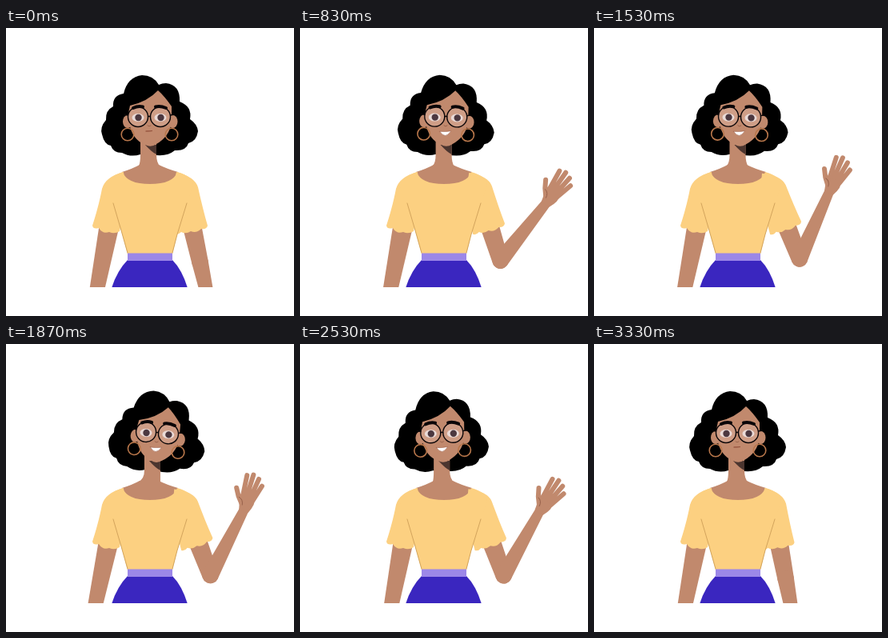
Recreate the animation shown at these times as an HTML page. Size 360x360 px, loop 3360 ms.

```html
<!DOCTYPE html>
<html lang="en">
<head>
<meta charset="utf-8">
<title>Waving woman</title>
<style>
  html, body { margin: 0; width: 100%; height: 100%; overflow: hidden; background: #fff; }
  svg { display: block; width: 100vw; height: 100vh; }
  .skin { fill: #c1896d; }
  .shirt { fill: #fcd081; }
  .line { fill: none; stroke-linecap: round; stroke-linejoin: round; }
  .finger { stroke: #c1896d; stroke-width: 6; }
  .seam { stroke: #d3a45c; stroke-width: 1; }
  .frame { stroke: #0b0608; stroke-width: 1.4; }
  .brow { stroke: #0b0608; stroke-width: 4; }
  .ring { stroke: #b9774b; stroke-width: 1.6; }
  .crease { stroke: #96604a; stroke-width: .9; }
</style>
</head>
<body>
<svg viewBox="0 0 360 360">
  <g class="head">
    <path id="hair" d="M191 71Q184 59 170 59Q152 61 147 82Q133 84 134 98Q124 103 125 115
      Q117 124 120 133Q123 146 131 147Q134 156 145 156Q156 162 168 158L182 158
      Q200 162 211 153Q225 154 228 144Q238 142 240 129Q239 120 230 114
      Q233 98 217 92Q218 71 200 69Q195 69 191 71Z"/>
  </g>

  <path id="neck" class="skin"/>
  <path id="neckShade" fill="#4b352f"/>
  <path class="skin" d="M167 171Q158 176 145 180Q150 200 180 200T215 180Q201 176 191 171Z"/>

  <g id="leftArm"><path class="skin" d="M117 244L104.500 326H123.500L142 246Z"/></g>
  <path id="upperArm" class="skin"/>
  <path id="forearm" class="skin"/>
  <g id="hand">
    <path class="skin" d="M-6 1L-9 -10Q-11 -18 -9 -21Q0 -25 8 -19Q12 -12 6 1Z"/>
    <path id="fingers" class="line finger"/>
    <path class="line crease" d="M-11 -14Q-5 -13 -4 -6"/>
  </g>

  <path class="shirt" d="M147 180Q124 186 120 201C117 217 112 235 108 247Q109 252 116 250
    Q121 258 129 255Q136 258 142 254L150 215Z"/>
  <g id="rightSleeve">
    <path class="shirt" d="M213 180Q236 186 240 199C244 217 248 233 252 247Q251 252 244 251
      Q238 257 231 254Q225 258 219 255Q215 259 211 257L206 210Z"/>
  </g>
  <path class="shirt" d="M146 180Q151 195 180 195T214 180Q232 185 234 195L226 219L214 258L208 283H152L144 253L124 196Q128 186 146 180Z"/>
  <path class="line seam" d="M134 219L144 253L152 281M226 219L214 258L208 281"/>
  <path fill="#3a26bf" d="M152 290H208Q220 302 227 325H132Q139 303 152 290Z"/>
  <path fill="#9c87e8" d="M152 281.500H208V291H152Z"/>

  <g class="head">
    <ellipse class="skin" cx="152" cy="117" rx="6" ry="8"/>
    <ellipse class="skin" cx="208.500" cy="117" rx="6" ry="8"/>
    <path class="skin" d="M190 78Q177 92 155 97Q152 108 154 119Q158 140 174 146Q181 150 188 145
      Q204 136 207 118L207 98Q198 85 190 78Z"/>
    <g id="eyes"></g>
    <path class="line brow" d="M159 100Q165 97 171 98.500M187 98.500Q193 97 200 100"/>
    <path class="line frame" d="M177.500 111Q179 109.500 180.500 111M152.500 109L148 108M205.500 109L210 108"/>
    <path class="line crease" d="M177 122Q179 124 181 122"/>
    <path id="mouth" class="line"/>
    <circle class="line ring" cx="152" cy="133" r="7.800"/>
    <circle class="line ring" cx="207" cy="133" r="7.800"/>
  </g>
  <path fill="#fff" d="M0 324H360V360H0Z"/>
</svg>

<script>
const LOOP = 3360, WAVE = 477, WAVE_START = 524;
const SHOULDER = [222, 200], UPPER = 95, LOWER = 91;
const FINGERS = [
  [-7, -18, -10, -43], [-2, -20, -2.5, -46], [3, -19, 5.5, -43], [7, -16, 12, -36]
];
const $ = id => document.getElementById(id);
const rad = deg => deg * Math.PI / 180;
const mix = (a, b, k) => a + (b - a) * k;
const clamp = (v, lo, hi) => Math.min(hi, Math.max(lo, v));
const smooth = (from, to, t) => {
  const k = clamp((t - from) / (to - from), 0, 1);
  return k * k * (3 - 2 * k);
};
const pulse = (t, a, b, c, d) => smooth(a, b, t) - smooth(c, d, t);

$('eyes').innerHTML = [165, 193].map(x => `
  <circle class="frame" cx="${x}" cy="111" r="12.5" fill="#cf9e87"/>
  <ellipse cx="${x}" cy="112" rx="7.5" ry="5" fill="#eadbd8"/>
  <circle cx="${x + .5}" cy="112" r="4.2" fill="#4c3840"/>`).join('');

// Point at a distance from p, with the angle measured clockwise from straight up
const reach = ([x, y], deg, len) =>
  [x + Math.sin(rad(deg)) * len, y - Math.cos(rad(deg)) * len];

// Tapered limb with round ends
function limb(p, q, r1, r2) {
  const deg = Math.atan2(q[0] - p[0], p[1] - q[1]) * 180 / Math.PI;
  const [a, b] = [reach(p, deg - 90, r1), reach(p, deg + 90, r1)];
  const [c, d] = [reach(q, deg + 90, r2), reach(q, deg - 90, r2)];
  return `M${a}A${r1} ${r1} 0 0 0 ${b}L${c}A${r2} ${r2} 0 0 0 ${d}Z`;
}

function drawArm(t, phase) {
  const raised = pulse(t, 0, 590, 2650, 3300);
  const wave = 32 - 10.5 * Math.cos(phase);
  const rest = mix(12.5, 10.7, t / LOOP);
  const upper = mix(rest, 21 - (wave - 26) * .28, raised);
  const fore = mix(180 - rest, wave, raised);
  const elbow = reach(SHOULDER, 180 - upper, UPPER);
  const wrist = reach(elbow, fore, LOWER);

  $('upperArm').setAttribute('d', limb(reach(SHOULDER, 180 - upper, 40), elbow, 12, 10.3));
  $('forearm').setAttribute('d', limb(elbow, wrist, 10.3, 6));
  $('rightSleeve').setAttribute('transform', `rotate(${12.5 - upper} ${SHOULDER})`);

  const bend = 9 * Math.cos(phase - rad(125));
  $('hand').setAttribute('transform', `translate(${wrist}) rotate(${fore + bend})`);
  const open = 1 - .85 * smooth(48, 70, fore);
  $('fingers').setAttribute('d', FINGERS.map(([x, y, tx, ty]) =>
    `M${x} ${y}L${mix(x, tx, open)} ${mix(y, ty, open)}`).join('') +
    'M-5 -7L-12 -15L-17.5 -24');
}

function drawHead(t, phase) {
  const sway = (2.3 + 8 * Math.cos(phase + Math.PI / 4)) * pulse(t, 0, 450, 2650, 3100);
  const shift = sway / 2;
  document.querySelectorAll('.head').forEach(g =>
    g.setAttribute('transform', `translate(${shift} 0) rotate(${shift} 180 170)`));
  // The far side of the hair tucks in as the head leans left
  const tuck = 1 + Math.min(0, sway) * .013;
  $('hair').setAttribute('transform', `translate(${120 * (1 - tuck)} 0) scale(${tuck} 1)`);
  $('leftArm').setAttribute('transform', `rotate(${sway * .1} 134 200)`);
  $('neck').setAttribute('d',
    `M${168 + shift} 138H${188 + shift}V158Q${188 + shift} 169 193 173V182H166V172Q${168 + shift} 168 ${168 + shift} 158Z`);
  $('neckShade').setAttribute('d',
    `M${174 + shift} 146H${188 + shift}V158Q${182 + shift} 155 ${174 + shift} 146Z`);

  const smile = pulse(t, 430, 600, 3050, 3250);
  const open = pulse(t, 530, 680, 3000, 3200);
  const w = mix(4, 7, smile);
  const left = 129 + open * .5;
  const mouth = $('mouth');
  mouth.setAttribute('d',
    `M${179 - w} ${left}Q179 ${129 + 4 * smile + 7 * open} ${179 + w} 128.5` +
    `Q179 ${mix(129 + 4 * smile, 130, open)} ${179 - w} ${left}Z`);
  mouth.style.fill = open > .1 ? '#fff' : 'none';
  mouth.style.stroke = '#96543f';
  mouth.style.strokeWidth = mix(.9, .5, open);
}

function draw(now) {
  const t = now % LOOP;
  const phase = (t - WAVE_START) / WAVE * 2 * Math.PI;
  drawArm(t, phase);
  drawHead(t, phase);
  requestAnimationFrame(draw);
}
draw(0);
</script>
</body>
</html>
```
